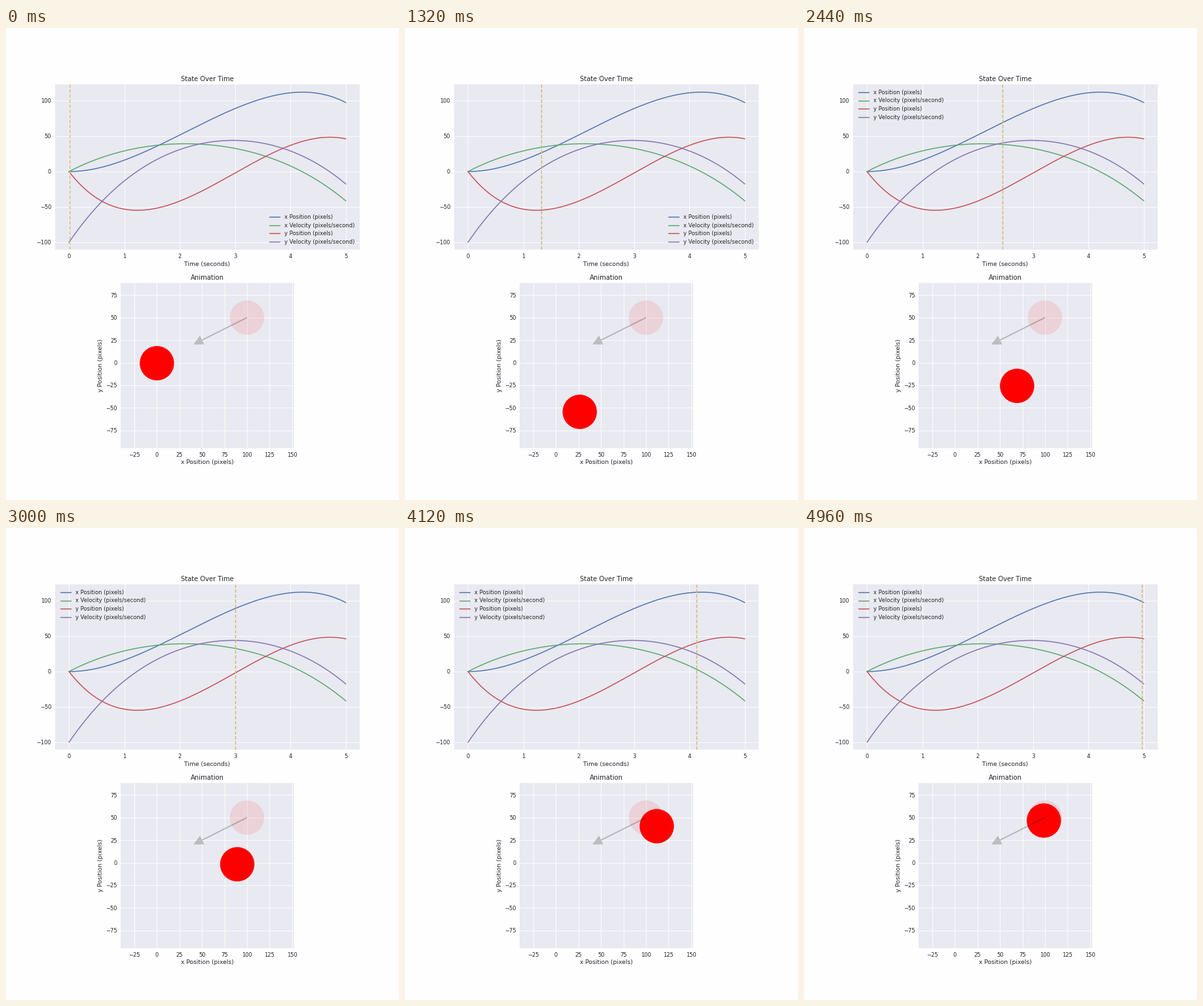
Animation of 600x720 px, one loop 5000 ms. Source, as a matplotlib script:

```python
import numpy as np
import matplotlib.pyplot as plt
from matplotlib.animation import FuncAnimation
from matplotlib.patches import Circle

FRAMES, INTERVAL = 125, 40
DURATION, STEPS = 5.0, 250
DT = DURATION / STEPS
DRAG = 0.5
WEIGHT = 10
GOAL, GOAL_VELOCITY = (100, 50), (-50, -25)
START_VELOCITY = (0, -100)
RADIUS = 19.05
MARGIN = 40

plt.style.use("seaborn-v0_8")
plt.rcParams.update({
    "font.family": "DejaVu Sans",
    "figure.facecolor": "#fefdff",
    "axes.facecolor": "#e9e9f1",
    "lines.linewidth": 1.75,
})


def steer(velocity, goal, goal_velocity):
    """Least-effort path of a dragged point towards a goal state."""
    step = np.array([[1, DT], [0, 1 - DRAG * DT]])
    push = np.array([0, DT])
    effect = np.array([np.linalg.matrix_power(step, STEPS - 1 - j) @ push
                       for j in range(STEPS)]).T
    state = np.array([0.0, velocity])
    miss = (goal, goal_velocity) - np.linalg.matrix_power(step, STEPS) @ state
    gram = effect @ effect.T + DT / WEIGHT * np.eye(2)
    control = effect.T @ np.linalg.solve(gram, miss)
    states = [state]
    for force in control:
        states.append(step @ states[-1] + push * force)
    return np.array(states).T


time = np.linspace(0, DURATION, STEPS + 1)
(x_pos, x_vel), (y_pos, y_vel) = (
    steer(*axis) for axis in zip(START_VELOCITY, GOAL, GOAL_VELOCITY))

fig, (chart, stage) = plt.subplots(2, 1, figsize=(10, 12), dpi=60)
fig.subplots_adjust(left=0.125, right=0.9, bottom=0.11, top=0.88, hspace=0.2)

series = [
    (x_pos, "x Position (pixels)", "#4C72B0"),
    (x_vel, "x Velocity (pixels/second)", "#55A868"),
    (y_pos, "y Position (pixels)", "#C44E52"),
    (y_vel, "y Velocity (pixels/second)", "#8172B2"),
]
for values, label, color in series:
    chart.plot(time, values, color=color, label=label)
chart.set_xlim(chart.get_xlim())
chart.set_ylim(chart.get_ylim())
chart.set_xticks(range(6))
chart.set_yticks(range(-100, 101, 50))
chart.set_title("State Over Time")
chart.set_xlabel("Time (seconds)", labelpad=3.3)
cursor = chart.axvline(0, color="#CCB974", linestyle="--")
# "best" moves the legend once the cursor clears the upper left corner.
chart.legend(loc="best", labelspacing=0.43)

stage.set_xlim(x_pos.min() - MARGIN, x_pos.max() + MARGIN)
stage.set_ylim(y_pos.min() - MARGIN, y_pos.max() + MARGIN)
stage.set_aspect("equal", adjustable="box")
stage.set_xticks(range(-25, 151, 25))
stage.set_yticks(range(-75, 76, 25))
stage.set_title("Animation")
stage.set_xlabel("x Position (pixels)", labelpad=3.3)
stage.set_ylabel("y Position (pixels)")

ball = Circle((0, 0), RADIUS, color="red", lw=0, zorder=3)
goal = Circle(GOAL, RADIUS, color="red", alpha=0.1, lw=0, zorder=4)
stage.add_patch(ball)
stage.add_patch(goal)
stage.arrow(*GOAL, *GOAL_VELOCITY, width=1, head_width=10, head_length=10,
            color="black", alpha=0.2, lw=0.5, zorder=5)


def update(frame):
    t = frame * INTERVAL / 1000 + 0.006
    cursor.set_xdata([t, t])
    ball.center = np.interp(t, time, x_pos), np.interp(t, time, y_pos)
    return cursor, ball


anim = FuncAnimation(fig, update, frames=FRAMES, interval=INTERVAL,
                     repeat=True, repeat_delay=0, blit=False)
plt.show()
```
